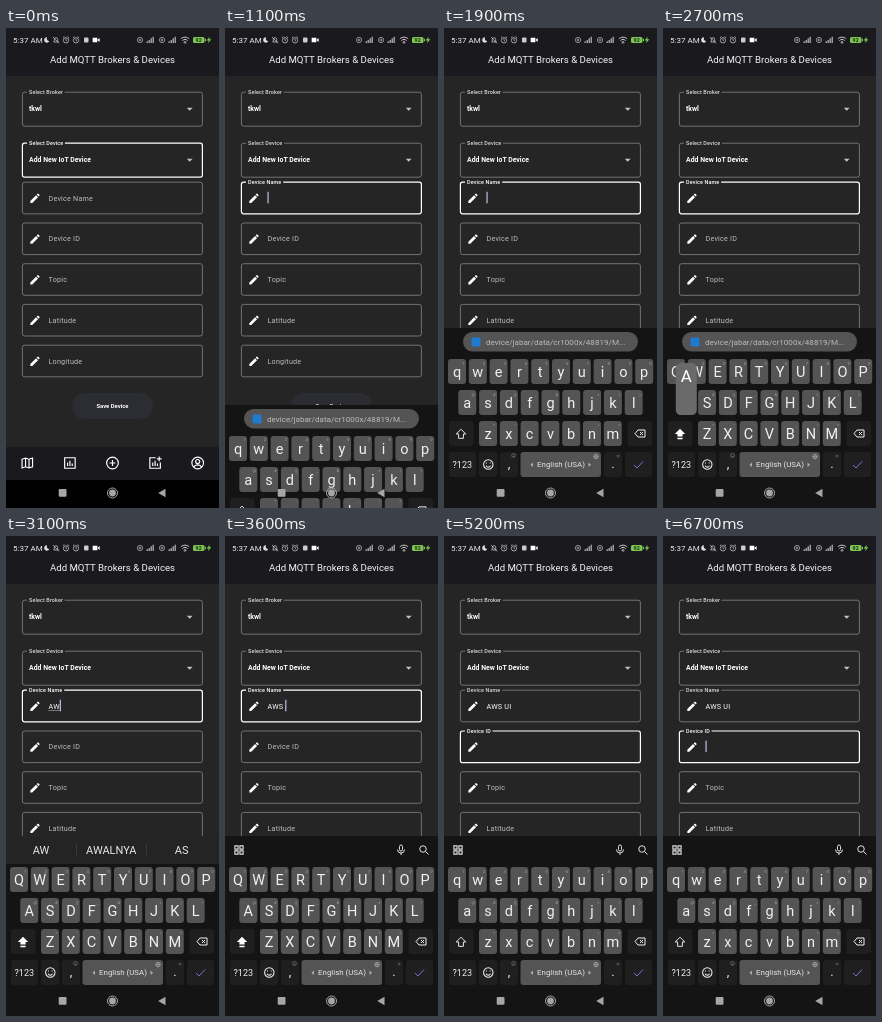
An HTML page that plays this animation: 213 px wide and 480 px high, repeating every 7000 ms.

```html
<!DOCTYPE html>
<html lang="en">
<head>
<meta charset="utf-8">
<title>Add device form</title>
<style>
  html, body { margin: 0; width: 100%; height: 100%; overflow: hidden; background: #000; }
  svg { display: block; width: 100vw; height: 100vh; font-family: Roboto, sans-serif; }
</style>
</head>
<body>
<svg id="stage" viewBox="0 0 213 480"></svg>
<script>
const LOOP = 7000, TICK = 100;
const BODY = '#252525', BAR = '#1a1a1e', LINE = '#8c8c8c';
const BOARD = '#141414', STRIP = '#242424', KEY = '#545454', SIDE_KEY = '#1f1f1f';
const NAME_FOCUS = 900, ID_FOCUS = 4700, CAPS_ON = 2100, CAPS_OFF = 4800;

// key down, key up, character
const presses = [
  [2700, 2900, 'A'], [3000, 3100, 'W'], [3200, 3300, 'S'],
  [3400, 3600, ' '], [3700, 3800, 'U'], [4000, 4200, 'I']
];
const suggestions = {
  A: ['A', 'AKU', 'ADA'], AW: ['AW', 'AWALNYA', 'AS'], AWS: ['AWS', 'AWAS', 'AS'],
  U: ['U', 'UI', 'UNTUK'], UI: ['UI', 'II', 'UK']
};
const keyRows = [
  { keys: 'qwertyuiop', hints: '1234567890', x: 13, y: 331 },
  { keys: 'asdfghjkl', hints: '@#$_&-+()', x: 23.3, y: 362 },
  { keys: 'zxcvbnm', hints: '*"\':;!?', x: 44, y: 393 }
];
const PITCH = 20.8;

const clamp = v => Math.max(0, Math.min(1, v));
const mix = (a, b, p) => a + (b - a) * p;
const pen = document.createElement('canvas').getContext('2d');
function textWidth(s, size, spacing = 0) {
  pen.font = `${size}px Roboto, sans-serif`;
  return pen.measureText(s).width + s.length * spacing;
}

const rect = (x, y, w, h, fill, r = 0, more = '') =>
  `<rect x="${x}" y="${y}" width="${w}" height="${h}" rx="${r}" fill="${fill}" ${more}/>`;
const text = (s, x, y, size, fill = '#fff', more = '') =>
  `<text x="${x}" y="${y}" font-size="${size}" fill="${fill}" ${more}>${s.replace(/&/g, '&amp;')}</text>`;
const MID = 'text-anchor="middle" ', BOLD = 'font-weight="600"', SPACED = 'letter-spacing=".22"';
const ring = (x, y, r) => `M${x - r} ${y}a${r} ${r} 0 1 0 ${2 * r} 0a${r} ${r} 0 1 0 ${-2 * r} 0`;
const place = (x, y, size) => `transform="translate(${x - size / 2} ${y - size / 2}) scale(${size / 24})"`;
const solid = (d, x, y, size, color = '#fff') => `<path d="${d}" fill="${color}" ${place(x, y, size)}/>`;
const outline = (d, x, y, size, color = '#fff', width = 2) =>
  `<path d="${d}" fill="none" stroke="${color}" stroke-width="${width}" ${place(x, y, size)}/>`;

const bars = 'M8 17v-6M12 17v-9M16 17v-4';
const art = {
  pencil: 'M3 17.25V21h3.75L17.81 9.94l-3.75-3.75zM20.71 7.04a1 1 0 0 0 0-1.41l-2.34-2.34a1 1 0 0 0-1.41 0l-1.83 1.83 3.75 3.75z',
  map: 'M3 5.5l6-2 6 2 6-2v15l-6 2-6-2-6 2zM9 3.5v15M15 5.5v15',
  chart: 'M3 3h18v18H3z' + bars,
  add: ring(12, 12, 10) + 'M12 7v10M7 12h10',
  addChart: 'M13 3H3v18h18v-10M19 1v8M15 5h8' + bars,
  account: ring(12, 12, 10) + ring(12, 9.5, 3.5) + 'M5.5 19c2-5 11-5 13 0',
  grid: 'M3 3h7v7H3zM14 3h7v7h-7zM3 14h7v7H3zM14 14h7v7h-7z',
  mic: 'M9 5a3 3 0 0 1 6 0v6a3 3 0 0 1-6 0zM5 11a7 7 0 0 0 14 0M12 18v4',
  search: ring(10, 10, 6.5) + 'M15 15l6 6',
  shift: 'M12 2L2 12h5v9h10v-9h5z',
  capsLock: 'M12 2L2 12h5v5h10v-5h5zM7 19h10v3H7z',
  erase: 'M8 5h14v14H8l-6-7zM12 9l6 6M18 9l-6 6',
  smile: ring(12, 12, 9) + 'M8 14c1 4 7 4 8 0M8.5 8v2M15.5 8v2',
  check: 'M3 13l6 6L21 6',
  globe: ring(12, 12, 10) + 'M2 12h20M12 2c-6 6-6 14 0 20c6-6 6-14 0-20',
  moon: 'M14 2a10 10 0 1 0 8 14A9 9 0 0 1 14 2z',
  bell: 'M5 18h14l-2-3v-5a5 5 0 0 0-10 0v5zM3 3l18 19',
  alarm: ring(12, 13, 8) + 'M12 8v5l3 2M3 5l4-3M21 5l-4-3',
  video: 'M2 5h14v14H2zM17 11l6-5v12l-6-5z',
  signal: 'M2 21v-5h3v5zM8 21V12h3v9zM14 21V7h3v14zM20 21V2h3v19z',
  wifi: 'M1 9c6-6 16-6 22 0M5 13.5c4-4 10-4 14 0M9 18c2-2 4-2 6 0l-3 3z',
  bolt: 'M14 1L4 14h7l-2 9 11-14h-7z'
};

function statusBar() {
  return text('5:37 AM', 7, 15, 8, '#eee') +
    solid(art.moon, 40.6, 12, 6.5, '#ddd') + outline(art.bell, 50, 12, 8, '#ddd') +
    outline(art.alarm, 60, 12, 8, '#ddd') + outline(art.alarm, 70, 12, 8, '#ddd') +
    rect(78, 9.5, 4.5, 5, '#ccc', 1) + solid(art.video, 90, 12, 8) +
    [134, 156].map(x => outline(ring(12, 12, 9) + ring(12, 12, 3), x, 12, 7, '#ddd') +
      solid(art.signal, x + 10, 12, 8, '#ddd')).join('') +
    outline(art.wifi, 179, 12, 9, '#ddd', 2.4) +
    rect(187, 9, 11.5, 6, '#7cc653', 1.6) + rect(199, 10.8, 1, 2.4, '#7cc653') +
    text('92', 192.7, 14, 5.4, '#223018', MID + BOLD) +
    solid(art.bolt, 203, 12, 7, '#7cc653');
}

// Outlined box; focus 0..1 sets the border, float 0..1 lifts the label into it
function box(label, y, h, focus, float, restX) {
  const size = mix(7.2, 5.4, float), spacing = mix(.22, .14, float);
  const gap = float ? rect(21, y - 2, (textWidth(label, 5.4, .14) + 4) * float, 4, BODY) : '';
  const border = `stroke="${focus > .5 ? '#fff' : LINE}" stroke-width="${mix(.75, 1.2, focus)}"`;
  return rect(16.4, y, 180, h, 'none', 2.2, border) + gap +
    text(label, mix(restX, 23, float), mix(y + h / 2 + 2.5, y + 1.9, float), size,
      focus > .5 ? '#fff' : float ? '#dcdcdc' : '#bdbdbd',
      `letter-spacing="${spacing}" font-weight="${float > .5 ? 500 : 400}"`);
}

const select = (label, value, y, focus) =>
  box(label, y, 34, focus, 1, 23) + text(value, 23, y + 18.9, 6.9, '#fff', BOLD) +
  `<path d="M180.8 ${y + 15.6}h5.8l-2.9 3z" fill="#c4c4c4"/>`;

const field = (label, y, focus = 0, float = 0) =>
  box(label, y, 31.6, focus, float, 42.5) + solid(art.pencil, 29, y + 16, 12.5);

const caret = (x, y) => rect(x, y, 1.1, 11.5, '#c9ccfa');

function form(t, typed) {
  const nameIn = clamp((t - NAME_FOCUS) / 180), idIn = clamp((t - ID_FOCUS) / 180);
  const typing = t >= NAME_FOCUS && t < ID_FOCUS;
  const done = presses.map(p => p[1]).filter(up => up <= t);
  const since = t >= ID_FOCUS ? ID_FOCUS : Math.max(NAME_FOCUS, ...done);
  const blinkOn = t >= NAME_FOCUS && Math.floor((t - since) / 500) % 2 === 0;
  const word = typed.split(' ').pop(), end = 42.5 + textWidth(typed, 7.2, .22);
  let out = rect(0, 0, 213, 480, BODY) + rect(0, 0, 213, 48, BAR) + statusBar() +
    text('Add MQTT Brokers & Devices', 106.5, 35.3, 9.65, '#f4f4f4', MID) +
    select('Select Broker', 'tkwl', 64.2, 0) +
    select('Select Device', 'Add New IoT Device', 115.2, 1 - nameIn) +
    field('Device Name', 154.2, nameIn * (1 - idIn), nameIn) +
    field('Device ID', 195, idIn, idIn) +
    field('Topic', 235.7) + field('Latitude', 276.4) + field('Longitude', 317.2) +
    text(typed, 42.5, 172.5, 7.2, '#fff', SPACED);
  if (typing && word) out += rect(end - textWidth(word, 7.2, .22), 174, textWidth(word, 7.2, .22), .5, '#ccc');
  if (blinkOn) out += typing ? caret(end, 163.8) : caret(42.5, 204.6);
  return out + rect(66, 365, 81, 26, '#2c2c33', 13) +
    text('Save Device', 106.5, 380.3, 5.9, '#fff', MID + BOLD) +
    rect(0, 419, 213, 33, BAR) +
    ['map', 'chart', 'add', 'addChart', 'account']
      .map((name, i) => outline(art[name], 21.3 + 42.6 * i, 435, 14)).join('') +
    rect(0, 452, 213, 28, '#000');
}

function strip(t, typed) {
  const words = t < CAPS_OFF && suggestions[typed.split(' ').pop()];
  if (words) {
    return rect(0, 300, 213, 28, STRIP) +
      words.map((w, i) => text(w, 35 + 70.3 * i, 317.6, 11, '#e8e8e8', MID)).join('') +
      rect(70, 308, .6, 11, '#4a4a4a') + rect(140, 308, .6, 11, '#4a4a4a');
  }
  if (!typed) {
    return rect(19, 304, 175, 19.5, KEY, 9.7) + rect(27.5, 309.5, 9, 9, '#1f7bd0', 1.5) +
      text('device/jabar/data/cr1000x/48819/M...', 42, 316.8, 8.1, '#bcbcbc');
  }
  return outline(art.grid, 14, 314, 11, '#e0e0e0', 2.4) + outline(art.mic, 176, 314, 12, '#e0e0e0') +
    outline(art.search, 199, 314, 12, '#e0e0e0');
}

function keyboard(t, typed) {
  const caps = t >= CAPS_ON && t < CAPS_OFF;
  const held = (presses.find(([down, up]) => t >= down && t < up) || [])[2];
  const ink = '#f0f0f0', dim = '#a4a4a4';
  const sideKey = (x, y, w, fill = SIDE_KEY) => rect(x, y, w, 25, fill, 3);
  let out = rect(0, 300, 213, 180, BOARD) + strip(t, typed), popup = '';
  for (const { keys, hints, x, y } of keyRows) {
    [...keys].forEach((k, i) => {
      const cx = x + PITCH * i, glyph = caps ? k.toUpperCase() : k;
      out += rect(cx - 9, y, 18, 25, KEY, 3) + text(glyph, cx, y + 18, 14.5, ink, MID) +
        text(hints[i], cx + 6.2, y + 5.6, 4.2, dim, MID);
      if (glyph === held) {
        popup = rect(cx - 10.5, y - 27, 21, 52, '#6a6a6a', 5) + text(glyph, cx, y - 8, 17, '#fff', MID);
      }
    });
  }
  const shiftDown = t === CAPS_ON - TICK;
  out += sideKey(5, 393, 24.5, shiftDown ? '#404040' : SIDE_KEY) +
    (caps ? solid(art.capsLock, 17, 406, 12.5) : outline(art.shift, 17, 406, 11.5, ink)) +
    sideKey(183.5, 393, 24.5) + outline(art.erase, 196, 405.5, 12, ink) +
    sideKey(5, 424, 27) + text('?123', 18.3, 440, 9, ink, MID) +
    sideKey(35, 424, 18.5) + outline(art.smile, 44.3, 436.5, 12.5, ink) +
    sideKey(56, 424, 18) + text(',', 65, 440, 13, ink, MID) +
    outline(art.smile, 69.5, 427.5, 5, dim) +
    sideKey(76.5, 424, 80.5, held === ' ' ? '#707070' : KEY) +
    text('English (USA)', 117, 439.4, 7.9, '#e6e6e6', MID) +
    '<path d="M89 434.5l-2.6 2.3 2.6 2.3zM144.5 434.5l2.6 2.3-2.6 2.3z" fill="#acacac"/>' +
    outline(art.globe, 152, 428.6, 5.5, '#c4c4c4') +
    sideKey(160, 424, 18) + text('.', 169, 440, 13, ink, MID) +
    text('!?', 174, 429.5, 4.2, dim, MID) +
    sideKey(181, 424, 27) + outline(art.check, 194.5, 436.5, 12, '#7a70d6');
  return out + popup;
}

const systemKeys = rect(52.7, 461, 7.8, 7.8, '#a6a6a6', 1) +
  '<circle cx="106.5" cy="465" r="5" fill="none" stroke="#a6a6a6"/><circle cx="106.5" cy="465" r="3.4" fill="#a6a6a6"/>' +
  '<path d="M159.5 460.7v8.6l-7.3-4.3z" fill="#a6a6a6"/>';

function scene(t) {
  const typed = presses.filter(p => p[1] <= t).map(p => p[2]).join('');
  const drop = 180 * (1 - clamp((t - 950) / 433)) ** 2;
  return form(t, typed) +
    (drop < 180 ? `<g transform="translate(0 ${drop})">${keyboard(t, typed)}</g>` : '') + systemKeys;
}

const stage = document.getElementById('stage');
let shown = -1;
function frame() {
  const t = Math.floor(performance.now() % LOOP / TICK) * TICK;
  if (t !== shown) stage.innerHTML = scene(shown = t);
  requestAnimationFrame(frame);
}
frame();
</script>
</body>
</html>
```
